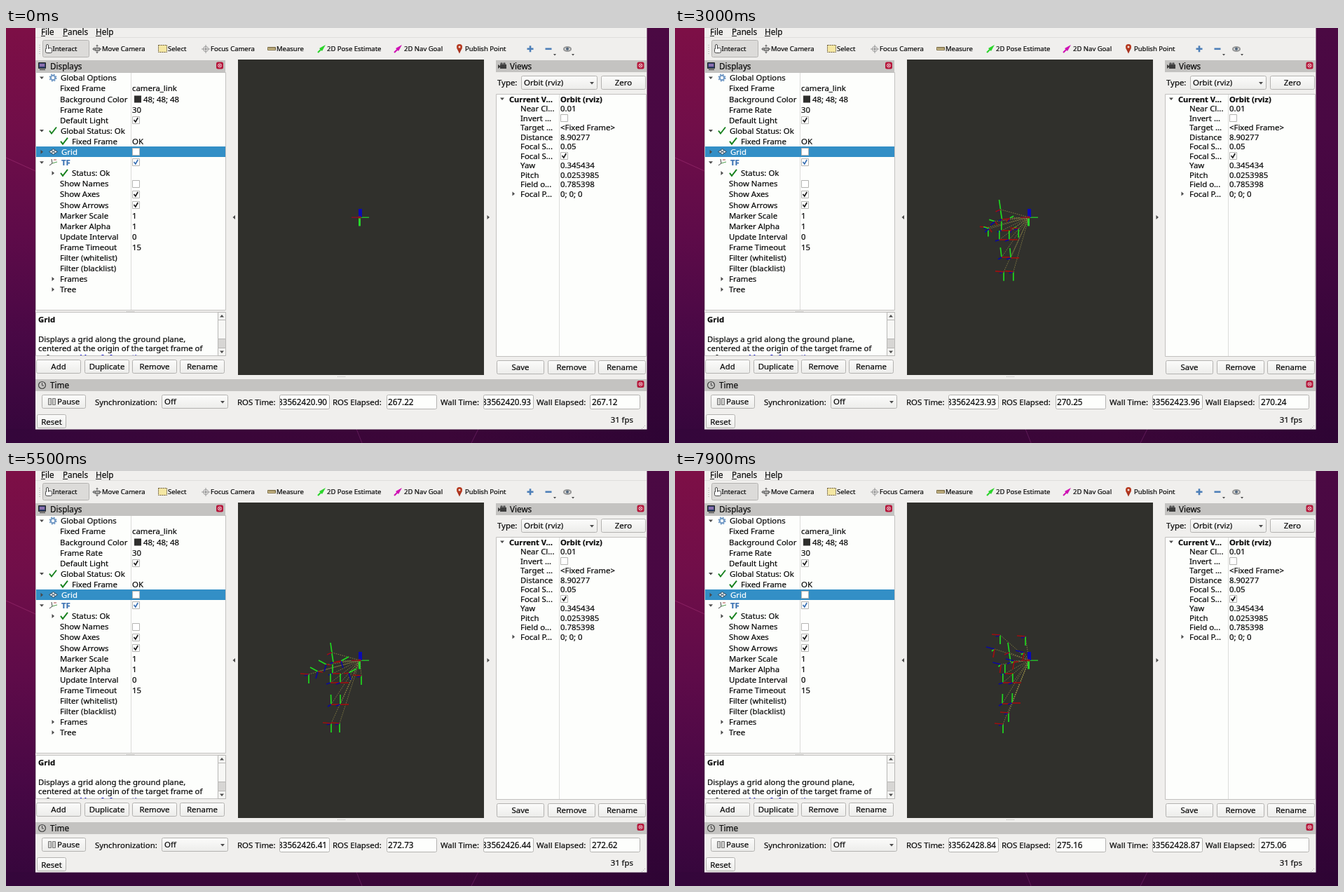
Animation of 946 by 592 pixels, one loop 8000 ms. Source, as an HTML page with a canvas:

```html
<!DOCTYPE html>
<html lang="en">
<head>
<meta charset="utf-8">
<title>Robot viewer</title>
<style>
html, body { margin: 0; width: 100%; height: 100%; overflow: hidden; background: #3a0732; }
canvas { display: block; width: 946px; height: 592px; }
</style>
</head>
<body>
<canvas id="stage" width="946" height="592"></canvas>
<script>
const W = 946, H = 592, LOOP = 8000, STEP = 100;
const FONT = '"Noto Sans", "Open Sans", sans-serif';
const stage = document.getElementById('stage').getContext('2d');
const base = document.createElement('canvas');
base.width = W; base.height = H;
let c = base.getContext('2d');

// ---- drawing helpers ----
function rect(x, y, w, h, fill) { c.fillStyle = fill; c.fillRect(x, y, w, h); }

function box(x, y, w, h, fill, edge, r = 0) {
  c.beginPath();
  c.roundRect(x + .5, y + .5, w - 1, h - 1, r);
  if (fill) { c.fillStyle = fill; c.fill(); }
  c.strokeStyle = edge; c.lineWidth = 1; c.stroke();
}

// A hairline outline gives the type a slightly heavier weight.
function text(s, x, y, o = {}) {
  c.font = `${o.bold ? 'bold ' : ''}${o.size || 11.4}px ${FONT}`;
  c.textAlign = o.align || 'left';
  c.fillStyle = c.strokeStyle = o.color || '#0c0c0c';
  c.fillText(s, x, y);
  c.lineWidth = .22;
  c.strokeText(s, x, y);
}

function line(pts, color, w = 1) {
  c.beginPath();
  for (let i = 0; i < pts.length; i += 2) c.lineTo(pts[i], pts[i + 1]);
  c.strokeStyle = color; c.lineWidth = w; c.stroke();
}

function poly(pts, fill) {
  c.beginPath();
  for (let i = 0; i < pts.length; i += 2) c.lineTo(pts[i], pts[i + 1]);
  c.closePath(); c.fillStyle = fill; c.fill();
}

function disc(x, y, r, fill) {
  c.beginPath(); c.arc(x, y, r, 0, 7); c.fillStyle = fill; c.fill();
}

function ring(x, y, r, color, w = 1) {
  c.beginPath(); c.arc(x, y, r, 0, 7); c.strokeStyle = color; c.lineWidth = w; c.stroke();
}

const down = (x, y, r = 3, col = '#4a4a4a') => poly([x - r, y - r / 2, x + r, y - r / 2, x, y + r / 2 + .5], col);
const up = (x, y, r = 3, col = '#4a4a4a') => poly([x - r, y + r / 2, x + r, y + r / 2, x, y - r / 2 - .5], col);
const right = (x, y, col = '#4a4a4a') => poly([x - 1.5, y - 3, x - 1.5, y + 3, x + 2, y], col);

function tick(x, y, color = '#15801c', w = 1.9) {
  line([x - 5, y, x - 2, y + 4, x + 5, y - 5], color, w);
}

function check(x, y, on, color = '#1c1c1c') {
  box(x - 5, y - 5, 11, 11, '#fff', '#b4b4b2');
  if (on) line([x - 2.5, y, x - .2, y + 3, x + 3.2, y - 3], color, 1.7);
}

function button(label, x, y, w, h = 20, base = 14.5) {
  const g = c.createLinearGradient(0, y, 0, y + h);
  g.addColorStop(0, '#fcfcfb'); g.addColorStop(1, '#ececea');
  box(x, y, w, h, g, '#b3b2b0', 2);
  if (label) text(label, x + w / 2, y + base, { align: 'center' });
}

function combo(label, x, y, w, h) {
  button('', x, y, w, h);
  text(label, x + 4, y + 14);
  down(x + w - 8, y + h / 2 + .5);
}

function header(label, x, y, w, tx) {
  rect(x, y, w, 17, '#c4c3c1');
  text(label, tx, y + 13, { size: 11.7 });
}

function closer(x, y) {
  c.beginPath(); c.roundRect(x - 5, y - 5, 10, 10, 2.5);
  c.fillStyle = '#b5163a'; c.fill();
  ring(x, y, 2.6, '#ecd0d6', .9);
  line([x - 1.3, y - 1.3, x + 1.3, y + 1.3], '#fff', .9);
  line([x + 1.3, y - 1.3, x - 1.3, y + 1.3], '#fff', .9);
}

function dots(x, y) {
  for (let i = 0; i < 6; i++) rect(x + i * 2, y, 1, 1, '#b4b4b2');
}

// ---- window parts ----
function wallpaper() {
  const fade = (x, y, w, h, g, cols) => {
    cols.forEach((col, i) => g.addColorStop(i / (cols.length - 1), col));
    rect(x, y, w, h, g);
  };
  const vertical = () => c.createLinearGradient(0, 0, 0, H);
  fade(0, 0, 480, H, vertical(), ['#7d0f46', '#700e49', '#5e0b49', '#480845', '#34063b']);
  fade(480, 0, 466, H, vertical(), ['#4b0943', '#490843', '#430740', '#38053a', '#2e0434']);
  fade(0, 572, W, 20, c.createLinearGradient(0, 0, W, 0), ['#34063b', '#3a0639', '#3b0638', '#2e0434']);
  line([0, 185, 42, 204], '#8a2263');
  line([500, 572, 508, 592], '#5f1a58');
  line([674, 572, 664, 592], '#5f1a58');
}

function arrowIcon(x, y, color) {
  line([x - 5, y + 5, x, y], color, 2.2);
  poly([x - 3, y - 1, x + 6, y - 6, x + 1, y + 3], color);
}

function toolbar() {
  [['File', 50, 6], ['Panels', 81, 7], ['Help', 128, 8]].forEach(([s, x, u]) => {
    text(s, x, 10, { size: 11.7 });
    rect(x, 11, u, 1, '#1c1c1c');
  });
  rect(42, 13, 872, 1, '#dfdedc');
  for (let y = 24; y < 38; y += 3) rect(47, y, 2, 1, '#c8c7c5');
  box(52, 17, 67, 25, '#dcdbd9', '#b4b3b1', 2);
  const labels = [['Interact', 66.5], ['Move Camera', 137], ['Select', 231], ['Focus Camera', 292],
    ['Measure', 386], ['2D Pose Estimate', 458], ['2D Nav Goal', 568], ['Publish Point', 655]];
  labels.forEach(([s, x]) => text(s, x, 33, { size: 9.5 }));
  // pointing hand
  c.beginPath(); c.roundRect(56.5, 28.5, 9, 7, 2); c.roundRect(57.5, 23.5, 3, 7, 1.5);
  c.fillStyle = '#fff'; c.fill(); c.strokeStyle = '#444'; c.lineWidth = 1; c.stroke();
  rect(58, 28, 2, 3, '#fff');
  // camera cross
  const gray = '#777';
  line([124, 30, 136, 30], gray); line([130, 24, 130, 36], gray);
  up(130, 25, 2, gray); down(130, 35, 2, gray); right(134, 30, gray);
  poly([126.5, 27, 126.5, 33, 123, 30], gray);
  box(127, 28, 7, 5, '#a9a9a7', '#666');
  // selection
  rect(218, 25, 11, 9, '#f5e7a3');
  c.setLineDash([2, 1]); box(217, 24, 13, 11, null, '#6c5a2a'); c.setLineDash([]);
  // focus
  ring(285, 30, 3.6, '#999'); disc(285, 30, 1.3, '#888');
  line([279, 30, 291, 30], '#999'); line([285, 24, 285, 36], '#999');
  // ruler
  box(373, 27, 12, 5, '#dccb97', '#7b6d47');
  for (let x = 375; x < 384; x += 2) rect(x, 28, 1, 2, '#7b6d47');
  arrowIcon(450, 30, '#2bd52b'); arrowIcon(559, 30, '#cf12b4');
  // pin
  poly([643.4, 29, 650.6, 29, 647, 36.5], '#a8321f');
  disc(647, 27, 4, '#b5391f'); disc(647, 27, 1.5, '#f2e4df');
  rect(743.5, 28.5, 9, 2.6, '#4d7fb8'); rect(746.7, 25.3, 2.6, 9, '#4d7fb8');
  rect(769.5, 28.5, 9, 2.6, '#4d7fb8'); down(783, 38, 2);
  c.beginPath(); c.ellipse(801, 30, 5, 2.8, 0, 0, 7); c.fillStyle = '#e8e8e6'; c.fill();
  c.strokeStyle = '#999'; c.stroke();
  disc(801, 29.8, 2.1, '#566a80'); down(809, 38, 2);
}

const ROWS = [
  ['Global Options', 78], ['Fixed Frame', 77, 'camera_link'], ['Background Color', 77, '48; 48; 48'],
  ['Frame Rate', 77, '30'], ['Default Light', 77, true], ['Global Status: Ok', 78],
  ['Fixed Frame', 94, 'OK'], ['Grid', 79, false], ['TF', 79, true], ['Status: Ok', 94],
  ['Show Names', 77, false], ['Show Axes', 77, true], ['Show Arrows', 77, true],
  ['Marker Scale', 77, '1'], ['Marker Alpha', 77, '1'], ['Update Interval', 77, '0'],
  ['Frame Timeout', 77, '15'], ['Filter (whitelist)', 77], ['Filter (blacklist)', 77],
  ['Frames', 77], ['Tree', 77]];

function gridIcon(x, y) {
  poly([x - 6, y, x, y - 4, x + 6, y, x, y + 4], '#dfe8ee');
  line([x - 6, y, x, y - 4, x + 6, y, x, y + 4, x - 6, y], '#2a4356');
  line([x - 3, y - 2, x + 3, y + 2], '#2a4356');
  line([x + 3, y - 2, x - 3, y + 2], '#2a4356');
}

function displays() {
  header('Displays', 42, 46, 271, 63);
  box(46, 49, 11, 9, '#31406b', '#222'); rect(48, 51, 7, 4, '#8a6fae'); rect(48, 59, 8, 1, '#333');
  closer(305, 53.5);
  box(42, 63, 272, 340, '#fdfefc', '#c2c1bf');
  rect(178, 64, 1, 338, '#dcdcda');
  rect(43, 169, 270, 15, '#338fc6');
  ROWS.forEach(([label, x, val], i) => {
    const y = 71 + i * 15.1, b = y + 4.3;
    const o = i === 7 ? { color: '#fff' } : i === 8 ? { color: '#3a71b3', bold: true } : {};
    text(label, x, b, o);
    if (typeof val === 'string') text(val, i === 2 ? 196 : 180, b);
    else if (val !== undefined) check(185, Math.floor(y), val, i === 8 ? '#3a71b3' : undefined);
    if ([0, 5, 8].includes(i)) down(51, y);
    if (i === 7) right(51, y);
    if ([9, 19, 20].includes(i)) right(67, y);
    if (i === 5) tick(67, y); if (i === 6 || i === 9) tick(83, y);
  });
  rect(183, 96.5, 10, 10, '#2f2f2d');
  ring(67, 71, 3.2, '#6f97c4', 2);
  c.setLineDash([2, 1.8]); ring(67, 71, 4.8, '#6f97c4', 1.4); c.setLineDash([]);
  gridIcon(67.5, 176.5);
  line([62, 196, 66, 193, 65, 187], '#444'); line([66, 193, 73, 191], '#4c9a4c'); line([68, 188, 72, 188], '#a44');
  dots(172, 404);
}

function help() {
  box(42, 405, 272, 63, '#fdfefc', '#c2c1bf');
  c.save();
  c.beginPath(); c.rect(43, 406, 259, 61); c.clip();
  text('Grid', 46, 420, { bold: true });
  text('Displays a grid along the ground plane,', 46, 447.5);
  text('centered at the origin of the target frame of', 46, 461);
  text('reference. ', 46, 474);
  text('More Information', 105, 474, { color: '#1010d0' });
  c.restore();
  box(302, 405, 12, 63, '#d7d6d4', '#b8b7b5');
  box(302, 405, 12, 12, '#f4f4f2', '#b8b7b5');
  box(302, 416, 12, 28, '#f7f7f5', '#b8b7b5');
  box(302, 456, 12, 12, '#f4f4f2', '#b8b7b5');
  up(308, 411); down(308, 462);
  [['Add', 43], ['Duplicate', 112], ['Remove', 180], ['Rename', 248]].forEach(([s, x]) => button(s, x, 473, 64, 20, 14));
}

const VIEW = [['Current V...', 'Orbit (rviz)'], ['Near Cl...', '0.01'], ['Invert ...', false],
  ['Target ...', '<Fixed Frame>'], ['Distance', '8.90277'], ['Focal S...', '0.05'], ['Focal S...', true],
  ['Yaw', '0.345434'], ['Pitch', '0.0253985'], ['Field o...', '0.785398'], ['Focal P...', '0; 0; 0']];

function views() {
  header('Views', 699, 46, 215, 719);
  rect(705, 52, 9, 6, '#3d3d3d'); poly([702, 52, 706, 55, 702, 58], '#3d3d3d');
  disc(707, 51, 1.8, '#555'); disc(711, 51, 1.8, '#555');
  closer(905.5, 53.5);
  text('Type:', 701, 82);
  combo('Orbit (rviz)', 735, 68, 109, 20);
  button('Zero', 849, 68, 64, 20, 14);
  box(699, 94, 215, 375, '#fdfefc', '#c2c1bf');
  rect(789, 95, 1, 373, '#dcdcda');
  VIEW.forEach(([label, val], i) => {
    const y = 101.3 + i * 13.52, b = y + 4.2, o = { bold: !i, size: i ? 11.4 : 11.1 };
    text(label, i ? 734 : 718, b, o);
    if (typeof val === 'string') text(val, 791, b, o);
    else check(796, Math.round(y), val);
  });
  down(708, 101); right(724, 236.5);
  [['Save', 700], ['Remove', 773], ['Rename', 845]].forEach(([s, x]) => button(s, x, 474, 68, 20, 14.3));
}

function clockPanel() {
  header('Time', 42, 501, 872, 63);
  ring(51.5, 509.5, 5, '#444', 1.2); line([51.5, 506, 51.5, 510, 54, 510], '#444');
  closer(905.5, 508);
  button('', 51, 523, 63);
  box(60, 528, 5, 10, '#d0d0ce', '#777'); box(66, 528, 5, 10, '#d0d0ce', '#777');
  text('Pause', 73, 537.3);
  text('Synchronization:', 127, 538);
  combo('Off', 222, 523, 95, 20);
  [['ROS Time:', 330], ['ROS Elapsed:', 466], ['Wall Time:', 620], ['Wall Elapsed:', 757]].forEach(([s, x]) => text(s, x, 538));
  [390, 543, 681, 833].forEach(x => box(x, 523, 72, 21, '#fdfefc', '#b3b2b0', 2));
  button('Reset', 44, 551, 42, 20, 14.6);
  text('31 fps', 895, 563, { align: 'right' });
  for (let i = 0; i < 3; i++) rect(911 - i * 2, 567 + i * 2, 1, 1, '#b4b4b2');
}

function drawBase() {
  wallpaper();
  rect(42, 0, 872.5, 572.6, '#f0efed');
  toolbar(); displays(); help(); views(); clockPanel();
  rect(331, 45, 351, 450, '#30302c');
  poly([327, 267, 327, 273, 323.5, 270], '#4a4a4a');
  right(688, 270);
  dots(473, 497);
}

// ---- motion ----
const lerp = (a, b, k) => a + (b - a) * k;

function span(times, t) {
  let i = 0;
  while (i < times.length - 2 && t >= times[i + 1]) i++;
  return [i, Math.min(1, Math.max(0, (t - times[i]) / (times[i + 1] - times[i])))];
}

// arms: left hand, left elbow, right elbow, right hand, raise
const ARMS = {
  bent: [449, 262, 440, 275, 472, 277, 479, 262, .8],
  low: [445, 304, 456, 296, 489, 295, 500, 307, 0],
  out: [426, 270, 440, 276, 497, 279, 512, 272, 0],
  half: [432, 290, 445, 286, 489, 288, 507, 292, 0],
  high: [453, 232, 448, 252, 478, 251, 475, 232, 1],
  wave: [464, 234, 456, 254, 498, 259, 500, 236, 1]
};
// legs: left knee, right knee, left foot, right foot, lean
const LEGS = {
  sit: [465, 319, 485, 321, 468, 335, 494, 337, -1],
  close: [467, 334, 474, 334, 470, 359, 473, 357, 0],
  stand: [464, 333, 477, 333, 464, 360, 476, 360, 0],
  kick: [466, 332, 481, 322, 467, 361, 484, 332, 0],
  lift: [467, 332, 481, 331, 468, 361, 476, 345, 12]
};
const KEYS = [[2200, 'bent', 'sit'], [3700, 'low', 'close'], [4150, 'out', 'stand'], [4800, 'high', 'stand'],
  [5150, 'out', 'stand'], [5500, 'half', 'stand'], [5750, 'low', 'close'], [6000, 'out', 'stand'],
  [6280, 'high', 'stand'], [6600, 'out', 'kick'], [6800, 'low', 'close'], [7000, 'out', 'stand'],
  [7250, 'wave', 'stand'], [7900, 'wave', 'lift']];
const KEY_TIMES = KEYS.map(k => k[0]);

function pose(t) {
  const [i, k] = span(KEY_TIMES, t), a = KEYS[i], b = KEYS[i + 1];
  const mix = (set, n) => set[a[n]].map((v, j) => lerp(v, set[b[n]][j], k));
  return [mix(ARMS, 1), mix(LEGS, 2)];
}

const RED = '#9c1010', GREEN = '#1fd81f', BLUE = '#0a0a9e';

function axes(x, y, r, g, b) {
  const arm = (v, col) => line([x, y, x + v[0], y + v[1]], col, 1.7);
  arm(g, GREEN); arm(b, BLUE); arm(r, RED);
}

function skeleton(t) {
  const [arm, leg] = pose(t), lean = leg[8], hx = lean * .4, raise = arm[8];
  const turn = (p, q) => [lerp(p[0], q[0], raise), lerp(p[1], q[1], raise)];
  const toward = (x, y, px, py) => {
    const d = Math.hypot(px - x, py - y) || 1;
    return [(px - x) / d * 14, (py - y) / d * 14];
  };
  const pivot = s => [turn([s * 7, 1], [-2, 12]), turn([-11 * s, -6], [-4, 3]), turn([-3 * s, 10], [-12, -3])];
  const end = [[-12, -1], [0, 13], [-6, 2]];
  const trunk = [[12, 0], [0, -13], [-6, 2]];
  const hips = [463 + hx, 302, 477 + hx, 302];
  const joints = [
    [465 + lean, 259, [-7, 3], [-2, -14], [-5, 3]],
    [467 + lean, 273, [11, -1], [-2, -13], [-5, 2]],
    [466 + hx, 289, ...trunk],
    [457 + lean * .7, 276, ...pivot(1)],
    [478 + lean * .5, 271, ...pivot(-1)],
    [arm[0], arm[1], ...end], [arm[2], arm[3], ...pivot(1)],
    [arm[4], arm[5], ...pivot(-1)], [arm[6], arm[7], ...end],
    [hips[0], hips[1], ...trunk], [hips[2], hips[3], ...trunk],
    [leg[0], leg[1], [12, 0], toward(leg[0], leg[1], hips[0], hips[1]), [-5, 3]],
    [leg[2], leg[3], [12, 0], toward(leg[2], leg[3], hips[2], hips[3]), [-6, 2]],
    [leg[4], leg[5], ...end], [leg[6], leg[7], ...end]];
  c.setLineDash([1.5, 1.5]);
  joints.forEach(j => line([j[0], j[1], 505, 270], 'rgba(200,185,85,.7)', .8));
  c.setLineDash([]);
  joints.forEach(j => axes(...j));
}

function cameraAxes() {
  rect(493, 269.5, 12, 1.5, '#8a0f22');
  rect(506, 269.5, 12, 1.5, '#27b52b');
  rect(503, 270, 3, 12.5, '#27d52b');
  rect(503, 258, 5, 12, '#0a0ab4');
  rect(502.5, 268.5, 4, 3, '#8c1a1a');
}

const MARKS = [0, 2200, 3700, 4800, 5500, 6600, 7900, 8000];
const ROS = [20.90, 23.11, 24.65, 25.70, 26.41, 27.53, 28.84, 28.94];
const WALL = [267.12, 269.42, 270.96, 271.98, 272.62, 273.78, 275.06, 275.16];

function counters(t) {
  const [i, k] = span(MARKS, t), size = 11.7;
  const ros = lerp(ROS[i], ROS[i + 1], k), wall = lerp(WALL[i], WALL[i + 1], k);
  const stamp = (v, x) => {
    c.save();
    c.beginPath(); c.rect(x + 1, 524, 69, 19); c.clip();
    text('16835624' + v.toFixed(2), x + 68, 537.6, { size, align: 'right' });
    c.restore();
  };
  stamp(ros, 390); stamp(ros + .03, 681);
  text((ros + 246.316).toFixed(2), 545, 537.6, { size });
  text(wall.toFixed(2), 836, 537.6, { size });
}

function draw(now) {
  const t = Math.floor((now % LOOP) / STEP) * STEP;
  c = stage;
  c.drawImage(base, 0, 0);
  if (t >= 2000) skeleton(t);
  cameraAxes();
  counters(t);
  requestAnimationFrame(draw);
}

drawBase();
requestAnimationFrame(draw);
</script>
</body>
</html>
```
